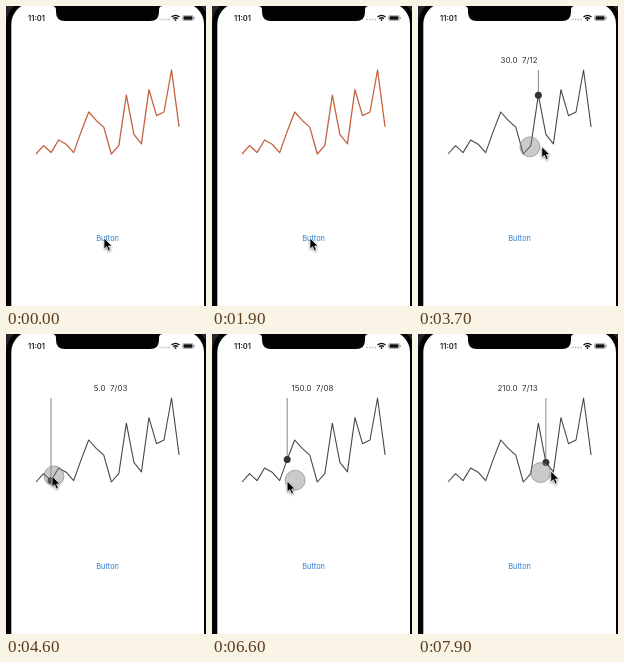
An HTML page for the animation above (8000 ms loop, 200 by 300 pixels).

```html
<!DOCTYPE html>
<html lang="en">
<head>
<meta charset="utf-8">
<title>Line chart on a phone</title>
<style>
  html, body { margin: 0; width: 100%; height: 100%; overflow: hidden; background: #fff; }
  svg { display: block; width: 200px; height: 300px; font-family: Inter, Roboto, sans-serif; }
  #chart { fill: none; stroke-linejoin: round; }
  #cursor { fill: #000; stroke: #fff; stroke-width: .7; filter: drop-shadow(0 1px 1px #0006); }
</style>
</head>
<body>
<svg viewBox="0 0 200 300">
  <!-- backdrop, bezel, screen, notch -->
  <rect width="200" height="300" fill="#26242a"/>
  <rect x="0" y="-6" width="203" height="330" rx="24" fill="#020203"/>
  <rect x="5.3" y="-3" width="192.7" height="330" rx="21" fill="#fff"/>
  <path d="M46 0Q50 0 50 4V6Q50 15 59 15H144Q153 15 153 6V4Q153 0 157 0Z" fill="#020203"/>

  <!-- status bar -->
  <text x="22" y="14.7" font-size="7.6" font-weight="600" fill="#222">11:01</text>
  <path d="M155 13.5H164" stroke="#b5b5b5" stroke-width="1.7" stroke-linecap="round" stroke-dasharray="0 2.7"/>
  <path d="M165.500 11Q169.500 7.600 173.500 11M167.200 12.700Q169.500 10.700 171.800 12.700"
    fill="none" stroke="#111" stroke-width="1.3"/>
  <circle cx="169.5" cy="14" r=".9" fill="#111"/>
  <rect x="176.5" y="9.5" width="11" height="5" rx="1.5" fill="none" stroke="#999" stroke-width=".7"/>
  <rect x="177.5" y="10.3" width="9" height="3.4" rx=".8" fill="#111"/>
  <rect x="188.2" y="11" width=".8" height="2" fill="#999"/>

  <text id="button" x="101.6" y="235" font-size="7.4" text-anchor="middle" fill="#2f7fd3">Button</text>
  <path id="chart" pathLength="1"/>

  <g id="touch">
    <g font-size="8" fill="#333">
      <text id="value" x="99.5" y="57" text-anchor="end"></text>
      <text id="date" x="104" y="57"></text>
    </g>
    <path id="rule" stroke="#888"/>
    <circle id="dot" r="3.5" fill="#333"/>
    <circle id="spot" r="10" fill="#808080" fill-opacity=".42" stroke="#777" stroke-opacity=".7" stroke-width=".8"/>
  </g>

  <path id="cursor" d="M0 0V11L2.600 8.700L4.400 12.900L6.400 12L4.600 8H8Z"/>
</svg>

<script>
const LOOP = 8000, STEP = 100;
const PRESSES = [300, 2020], PRESS_MS = 180, DRAW_DELAY = 85, DRAW_MS = 1000;
const TOUCH_AT = 3300, SPOT_LAG = 50, RULE_LAG = 8;
const values = [0, 30, 5, 50, 35, 5, 80, 150, 120, 96, 0, 30, 210, 70, 36, 230, 137, 150, 300, 97];

// turning points of the pointer: time, x, y
const turns = [
  [2250, 98, 232], [2600, 76, 155], [3200, 36, 142], [4000, 163, 140], [4600, 46, 142],
  [5500, 110, 136], [5850, 165, 138], [7050, 35, 151], [7300, 36, 152], [8200, 165, 132]
];

const $ = id => document.getElementById(id);
const [chart, button, touch, value, date, rule, dot, spot, cursor] =
  ["chart", "button", "touch", "value", "date", "rule", "dot", "spot", "cursor"].map($);

const px = i => 30 + i * 7.53;
const py = i => 148 - values[i] * 0.28;
const clamp = (n, lo, hi) => Math.min(hi, Math.max(lo, n));
const ease = k => (1 - Math.cos(Math.PI * clamp(k, 0, 1))) / 2;
const nearest = x => clamp(Math.round((x - 30) / 7.53), 0, values.length - 1);
const set = (el, attrs) => { for (const k in attrs) el.setAttribute(k, attrs[k]); };

function pointer(t) {
  const n = Math.max(1, turns.findIndex(p => p[0] >= t));
  const [t0, x0, y0] = turns[n - 1], [t1, x1, y1] = turns[n];
  const k = ease((t - t0) / (t1 - t0));
  return [x0 + (x1 - x0) * k, y0 + (y1 - y0) * k];
}

function drawn(t) {
  const press = PRESSES.filter(p => t >= p + PRESS_MS).pop();
  return press ? clamp((t - press - DRAW_DELAY) / DRAW_MS, 0, 1) : 1;
}

function render(time) {
  const t = Math.floor((time % LOOP) / STEP) * STEP;
  const touching = t >= TOUCH_AT;
  const [x, y] = pointer(t);

  set(cursor, { transform: `translate(${x} ${y})` });
  set(button, { opacity: PRESSES.some(p => t >= p && t < p + PRESS_MS) ? 0.5 : 1 });
  set(chart, {
    stroke: touching ? "#484848" : "#c4633f",
    "stroke-width": touching ? 1.1 : 1.3,
    "stroke-dasharray": `${drawn(t)} 2`
  });
  set(touch, { visibility: touching ? "visible" : "hidden" });

  // the spot and the label trail the rule a little
  const [sx, sy] = pointer(t - SPOT_LAG);
  const at = nearest(pointer(t - RULE_LAG)[0]), read = nearest(sx);
  value.textContent = values[read].toFixed(1);
  date.textContent = "7/" + String(read + 1).padStart(2, "0");
  set(spot, { cx: sx, cy: sy });
  set(dot, { cx: px(at), cy: py(at) });
  set(rule, { d: `M${px(at)} 64V${py(at)}` });
}

set(chart, { d: "M" + values.map((v, i) => `${px(i)} ${py(i)}`).join("L") });
const begin = performance.now();
function frame() {
  render(performance.now() - begin);
  requestAnimationFrame(frame);
}
frame();
</script>
</body>
</html>
```
